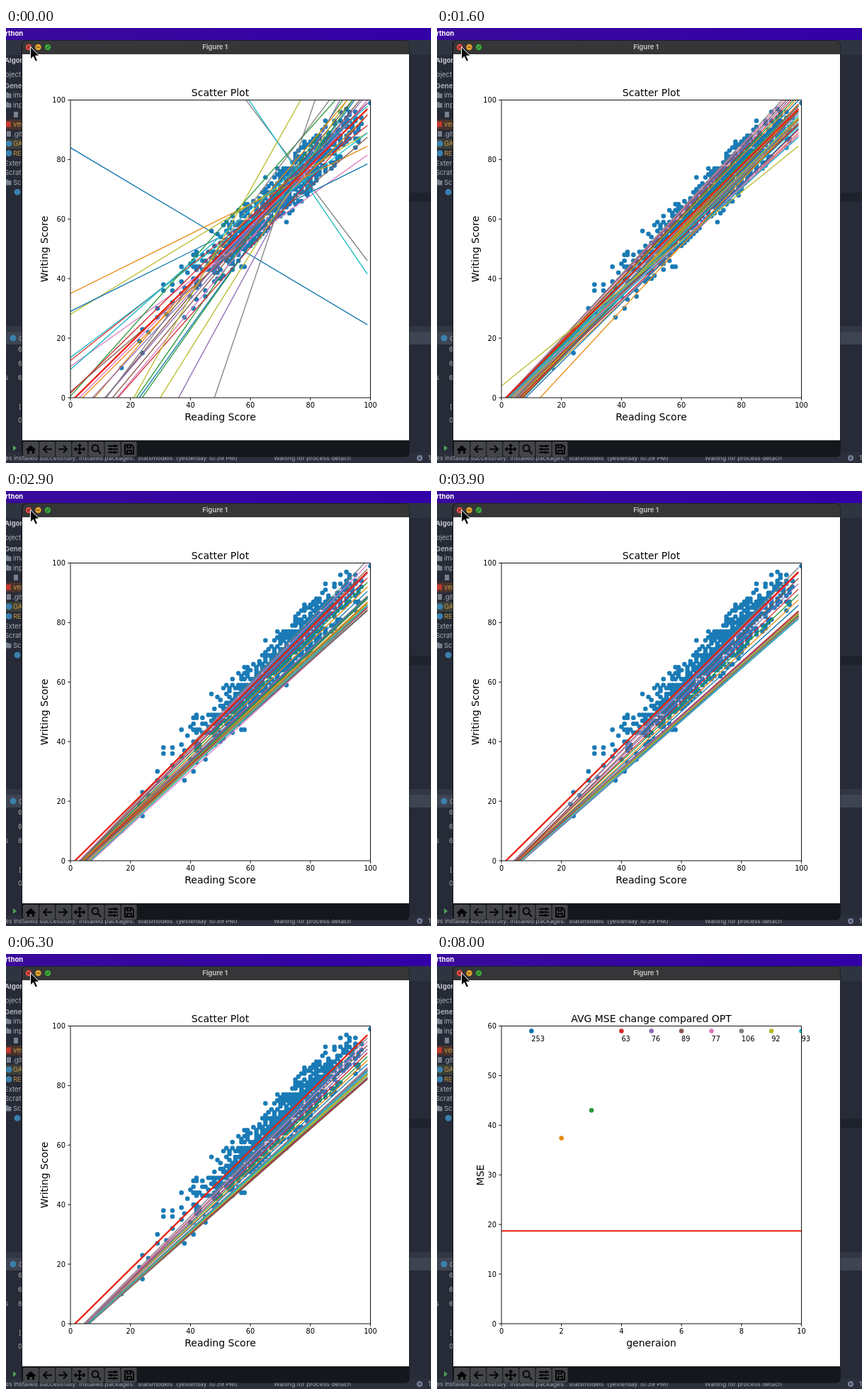
An HTML page that plays this animation: 600 px wide and 613 px high, repeating every 8100 ms.

```html
<!DOCTYPE html>
<html lang="en">
<head>
<meta charset="utf-8">
<title>Line fitting</title>
<style>
html, body { margin: 0; width: 100%; height: 100%; overflow: hidden; background: #262b37; }
svg { display: block; width: 100%; height: 100%; }
text { font-family: "DejaVu Sans", sans-serif; }
.ui text { font-family: Inter, sans-serif; font-size: 9.5px; fill: #a9adb5; }
.ui .b { font-weight: 700; }
.ui .s { font-size: 8.6px; }
.icons path { fill: none; stroke: #050505; stroke-width: 2; }
</style>
</head>
<body>
<svg id="stage" viewBox="0 0 600 613">
  <defs>
    <linearGradient id="bar"><stop stop-color="#3a0a9c"/><stop offset="1" stop-color="#3300a8"/></linearGradient>
    <clipPath id="axes"><rect x="91" y="101.5" width="423.5" height="419.5"/></clipPath>
  </defs>
  <g class="ui">
    <rect width="600" height="613" fill="#262b37"/>
    <rect width="600" height="17" fill="url(#bar)"/>
    <rect y="17" width="600" height="21" fill="#2f3441"/>
    <rect y="129" width="23" height="14" fill="#4a342c"/>
    <rect y="156" width="23" height="14" fill="#3d4038"/>
    <rect x="569" y="232" width="31" height="13" fill="#1e222c"/>
    <rect y="420" width="600" height="8" fill="#323743"/>
    <rect y="428" width="600" height="18" fill="#3e4451"/>
    <rect y="598" width="600" height="15" fill="#2b303c"/>
    <g id="side"></g>
    <path d="M10 588l5 4-5 4z" fill="#4fa25a"/>
    <text class="s" x="-1" y="609">es installed successfully: Installed packages: 'statsmodels' (yesterday 10:39 PM)</text>
    <text class="s" x="378" y="609">Waiting for process detach</text>
    <circle cx="584" cy="606" r="4" fill="#7d83a0"/>
    <path d="M582 604l4 4m0-4l-4 4" stroke="#262b37"/>
    <text x="596" y="609">1</text>

    <rect x="22" y="17.5" width="547.5" height="587" rx="6" fill="#0c0e13"/>
    <path d="M23 37V24q0-6 6-6H563q6 0 6 6V37z" fill="#363638"/>
    <rect x="23" y="37" width="546" height="544" fill="#fff"/>
    <path d="M23 581H569V598q0 6-6 6H29q-6 0-6-6z" fill="#15171d"/>
    <text class="b" x="295" y="30" text-anchor="middle" style="fill:#bcbcbe">Figure 1</text>
    <circle cx="32" cy="27" r="4.2" fill="#ed4b43"/>
    <circle cx="45.5" cy="27" r="4.2" fill="#e5a52d"/>
    <circle cx="59" cy="27" r="4.2" fill="#36a93a"/>
    <path d="M30 25l4 4m0-4l-4 4M43.5 27h4M57 29l4-4" stroke="#4d2417"/>
    <g class="icons">
      <g id="tiles" fill="#434548"></g>
      <path d="M28 594l7-6 7 6v1h-2v5h-3v-4h-4v4h-3v-5h-2z" style="fill:#050505;stroke:none"/>
      <path d="M65 593.5H53m5-5l-5 5 5 5M74 593.5H86m-5-5l5 5-5 5"/>
      <path d="M97 593.5h14M104 586.5v14M99 591l-2 2.5 2 2.5M109 591l2 2.5-2 2.5M101.5 589l2.5-2 2.5 2M101.5 598l2.5 2 2.5-2"/>
      <circle cx="126" cy="592" r="4.5" fill="none" stroke="#050505" stroke-width="2"/>
      <path d="M129.5 595l4.5 5"/>
      <path d="M144 589h14m-14 4.500h14m-14 4.500h14M154 587v4m-6 .5v4m5 .5v4"/>
      <path d="M168 587.500h9l3 3v9.500h-12zM171 588v3.500h5v-3.500M171 600v-4.500h6v4.500"/>
    </g>
  </g>
  <g id="plots"></g>
  <path d="M34.5 26.5v17.5l4-3.700 3 6.700 3-1.300-3-6.500h5.500z" fill="#050505" stroke="#fff"/>
</svg>
<script>
const LOOP = 8100, STEP = 710, DOT = 3.3;
const COLORS = ["#0f74ae", "#e9880f", "#2b9a3a", "#d12c2f", "#8d68b5",
                "#86564c", "#dc78bd", "#7f7f7f", "#b9ba2b", "#18b9c6"];
const RED = "#e8210f", BLUE = "#1a7bb6";
const $ = id => document.getElementById(id);

function add(parent, tag, attrs, text) {
  const node = document.createElementNS("http://www.w3.org/2000/svg", tag);
  for (const k in attrs) node.setAttribute(k, attrs[k]);
  if (text !== undefined) node.textContent = text;
  parent.append(node);
  return node;
}

function seeded(s) {
  return () => {
    s = s + 0x6D2B79F5 | 0;
    let t = Math.imul(s ^ s >>> 15, 1 | s);
    t ^= t + Math.imul(t ^ t >>> 7, 61 | t);
    return ((t ^ t >>> 14) >>> 0) / 4294967296;
  };
}

// Editor strip behind the window
const side = $("side");
function note(y, text, x = -2, color = "#a9adb5", bold = "") {
  add(side, "text", { x, y: y + 3.5, class: bold, style: `fill:${color}` }, text);
}
const dot = (cx, cy) => add(side, "circle", { cx, cy, r: 4.5, fill: "#3b80ad" });
note(7.5, "rthon", -1, "#fff", "b");
note(45, "Algorithm", -2, "#c6c8cd", "b");
note(65, "oject", -1);
const files = ["Genetic", "/images", "/input", "", "!venv", ".gitignore", "*GA.py", "*README",
               "External", "Scratches", "/Scripts", ""];
files.forEach((name, i) => {
  const y = 81 + 13.65 * i, kind = name[0];
  if (kind === "/") add(side, "path", { d: `M0 ${y - 4}h3l1 1.5h3.5v6.5H0z`, fill: "#79818f" });
  if (kind === "!") add(side, "rect", { x: 0, y: y - 4, width: 7, height: 8, fill: "#c3392f" });
  if (kind === "*") dot(4, y);
  if (i === 3 || kind === ".") add(side, "rect", { x: i === 3 ? 11 : 1, y: y - 4, width: 6, height: 8, fill: "#79818f" });
  if (i === 11) dot(16, y);
  if (/^[/!*]/.test(name)) note(y, name.slice(1), 10, kind === "/" ? undefined : "#c99a45");
  else note(y, name, kind === "." ? 9 : -2, undefined, i ? "" : "b");
});
dot(10, 437);
note(437, "GA", 18);
for (let i = 0; i < 3; i++) note(452 + 20 * i, "6", 17);
note(492, "s");
note(533, "[", 18);
note(552, "0", 17);
for (let i = 0; i < 7; i++) add($("tiles"), "rect", { x: 24 + 23.1 * i, y: 583, width: 22, height: 21, rx: 2 });

// Axes with ticks; returns the data group and the two scales
function chart(title, xName, yName, xMax, yMax, yStep, yNameX) {
  const g = add($("plots"), "g", { display: "none" });
  const px = v => 91 + 423.5 * v / xMax, py = v => 521 - 419.5 * v / yMax;
  const label = (x, y, s, size, anchor = "middle") =>
    add(g, "text", { x, y, "font-size": size, "text-anchor": anchor }, s);
  const data = add(g, "g", { "clip-path": "url(#axes)" });
  let ticks = "M91 101.5H514.5V521H91z";
  for (let v = 0; v <= xMax; v += xMax / 5) {
    ticks += `M${px(v)} 521v3.7`;
    label(px(v), 535, v, 9.8);
  }
  for (let v = 0; v <= yMax; v += yStep) {
    ticks += `M91 ${py(v)}h-3.7`;
    label(84, py(v) + 3.8, v, 9.8, "end");
  }
  add(g, "path", { d: ticks, fill: "none", stroke: "#111" });
  label(302.5, 96, title, 14);
  label(302.5, 552.5, xName, 14);
  label(0, 0, yName, 14).setAttribute("transform", `translate(${yNameX} 311.5) rotate(-90)`);
  return { g, data, px, py, label };
}

// Scores: a correlated cloud plus the points that stand out
const outliers = [
  [17, 10], [23, 19], [24, 23], [24, 15], [26, 22], [29, 27], [29, 30], [31, 38], [31, 36],
  [34, 38], [34, 36], [32, 28], [34, 32], [37, 35], [38, 27], [42, 48], [47, 56], [57, 44],
  [58, 44], [72, 59], [65, 74], [85, 93], [92, 97], [100, 99]];
const fit = x => -1.5 + 0.995 * x;
const rnd = seeded(11);
const gauss = () => Math.sqrt(-2 * Math.log(1 - rnd())) * Math.cos(2 * Math.PI * rnd());
const scores = new Map(outliers.map(p => [p.join(), p]));
for (let i = 0; i < 960; i++) {
  const x = Math.round(69 + 14 * gauss()), off = 4.4 * gauss();
  const y = Math.round(fit(x) + off);
  if (x > 36 && x < 98 && Math.abs(off) < 9.5 && y < 97) scores.set(x + "," + y, [x, y]);
}

// First generation: height of each line at x = 0 and x = 99
const first = [
  [84, 24.5], [35, 84.5], [-32, 112], [12.5, 91.5], [-67, 117],
  [-14, 106], [10.5, 81.5], [178, 46], [28, 89], [188, 41.5],
  [29, 78.5], [-4, 95], [-34, 107], [-18, 95], [-13.5, 102],
  [2, 87.5], [-18.5, 100], [-143, 152], [-48, 111], [13.5, 89],
  [-32, 106], [-9.5, 108], [0.5, 112], [1.5, 99], [-8, 99],
  [-17, 103], [-3, 97], [-16, 117], [-38, 140], [9.5, 98]];

// Later generations: range at x = 0, range at x = 99, top of the few stray lines
const spreads = [
  [-10, 3, 88, 104, 108],
  [-8, -1.5, 88, 99, 106],
  [-7, -2, 85, 93, 101],
  [-6.5, -3, 84, 89, 101],
  [-6.2, -4, 81.2, 84, 98.5],
  [-6, -4.6, 83.5, 86.5, 98.5],
  [-6, -4.4, 80.5, 84, 96],
  [-5.6, -4.4, 82, 86, 96],
  [-5.6, -4.4, 81.5, 85, 95.5]];

function breed([a, b, c, d, top], i) {
  const r = seeded(i + 3), lines = [];
  for (let k = 0; k < 30; k++) lines.push([a + (b - a) * r(), c + (d - c) * r()]);
  for (let k = 0; k < 8; k++) lines.push([b - r(), d + (top - d) * (k + 1) / 8]);
  // the youngest populations still hold a few widely scattered lines
  if (i < 2) for (let k = 0; k < 4; k++) lines.push([4 - 6 * k, 84.5 + 3 * k]);
  return lines;
}

const scenes = [first, ...spreads.map(breed)].map(lines => {
  const { g, data, px, py } = chart("Scatter Plot", "Reading Score", "Writing Score", 100, 100, 20, 59);
  const line = (y0, y1, stroke, width) => add(data, "path",
    { d: `M${px(0)} ${py(y0)}L${px(99)} ${py(y1)}`, stroke, "stroke-width": width });
  for (const [x, y] of scores.values()) add(data, "circle", { cx: px(x), cy: py(y), r: DOT, fill: BLUE });
  lines.forEach(([y0, y1], k) => line(y0, y1, COLORS[k % 10], 1.3));
  line(fit(0), fit(99), RED, 2.3);
  return g;
});

// Summary: error per generation, values above the axis sit at the top with a label
const errors = [253, 37.4, 43, 63, 76, 89, 77, 106, 92, 93];
const sum = chart("AVG MSE change compared OPT", "generaion", "MSE", 10, 60, 10, 66);
errors.forEach((e, i) => {
  const x = sum.px(i + 1);
  add(sum.data, "circle", { cx: x, cy: sum.py(Math.min(e, 59)), r: DOT, fill: COLORS[i] });
  if (e > 60) sum.label(x, 123, e, 9.8, "start");
});
add(sum.data, "path", { d: `M91 ${sum.py(18.7)}H514.5`, stroke: RED, "stroke-width": 2.2 });
scenes.push(sum.g);

let shown;
function draw(now) {
  const scene = scenes[Math.min(10, Math.floor(now % LOOP / STEP))];
  if (scene !== shown) {
    if (shown) shown.setAttribute("display", "none");
    scene.removeAttribute("display");
    shown = scene;
  }
  requestAnimationFrame(draw);
}
draw(performance.now());
</script>
</body>
</html>
```
